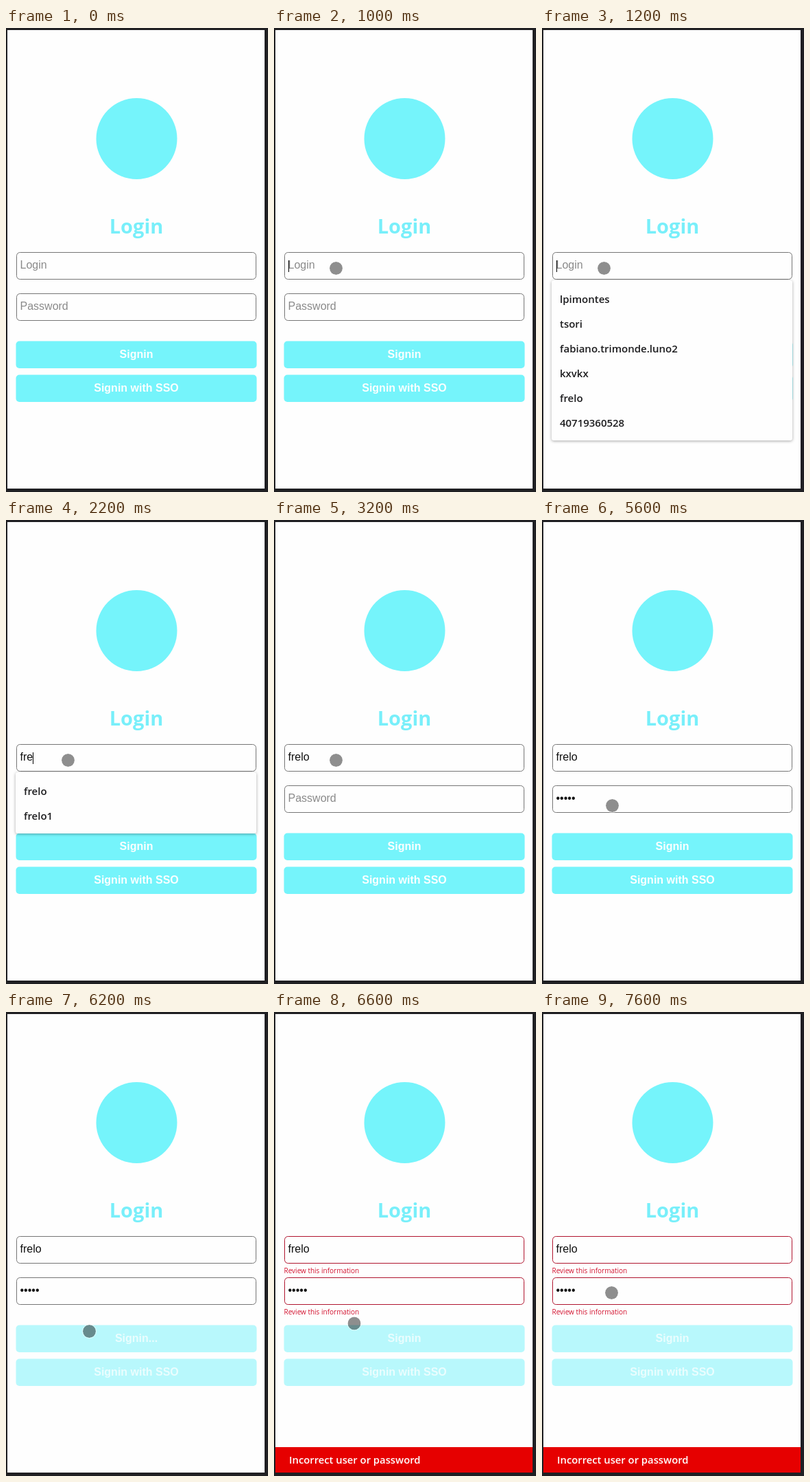
An HTML page with a canvas that plays this animation: 382x675 px, repeating every 8000 ms.

```html
<!DOCTYPE html>
<html lang="en">
<head>
<meta charset="utf-8">
<title>Login</title>
<style>
  html, body { margin: 0; width: 100%; height: 100%; overflow: hidden; background: #1f1f22; }
  canvas { display: block; }
</style>
</head>
<body>
<canvas id="stage" width="382" height="675"></canvas>
<script>
const ctx = document.getElementById('stage').getContext('2d');
const LOOP = 8000, TICK = 200;
const ARIAL = '"Liberation Sans", Arial, sans-serif';
const HUMAN = '"Open Sans", "Noto Sans", sans-serif';
const PAPER = '#fefefe', CYAN = '#75f4fb', PALE = '#b8f8fc';

const USER = 'frelo';
const SAVED = ['lpimontes', 'tsori', 'fabiano.trimonde.luno2', 'kxvkx', USER, '40719360528', USER + '1'];

// Pointer stops: time, x, y
const POINTER = [
  [600, 118, 430], [800, 93, 366], [1000, 90.5, 349.5],
  [5200, 90.5, 349.5], [5400, 95, 377], [5600, 102.5, 415.5],
  [5800, 113, 446], [6000, 121.5, 464.5], [6400, 121.5, 464.5],
  [6600, 117, 453], [6800, 108, 432], [7000, 102, 416],
  [7200, 101.5, 417], [7400, 101.5, 417], [7600, 101.5, 408.5]
];
const PASSWORD_KEYS = [3400, 3600, 3800, 4600, 5000];

function pointerAt(t) {
  if (t < POINTER[0][0]) return null;
  const i = POINTER.findIndex(p => p[0] > t);
  if (i < 0) return POINTER[POINTER.length - 1].slice(1);
  const [t0, x0, y0] = POINTER[i - 1], [t1, x1, y1] = POINTER[i];
  const k = (t - t0) / (t1 - t0);
  return [x0 + (x1 - x0) * k, y0 + (y1 - y0) * k];
}

function text(str, x, y, font, color, align = 'left') {
  ctx.font = font;
  ctx.fillStyle = color;
  ctx.textAlign = align;
  ctx.fillText(str, x, y);
}

function roundBox(x, y, w, h, r) {
  ctx.beginPath();
  ctx.roundRect(x, y, w, h, r);
}

function disc(x, y, r, color) {
  ctx.beginPath();
  ctx.arc(x, y, r, 0, Math.PI * 2);
  ctx.fillStyle = color;
  ctx.fill();
}

function pointer(x, y) {
  disc(x, y, 9.5, 'rgba(0,0,0,.44)');
  ctx.beginPath();
  ctx.arc(x, y, 10, 0, Math.PI * 2);
  ctx.lineWidth = 1;
  ctx.strokeStyle = 'rgba(255,255,255,.6)';
  ctx.stroke();
}

function field(y, value, hint, { caret, error }) {
  const font = '16px ' + ARIAL;
  roundBox(15.5, y + 0.5, 349, 39, 5);
  ctx.lineWidth = 1;
  ctx.strokeStyle = error ? '#b0152f' : '#767676';
  ctx.stroke();
  text(value || hint, 20.5, y + 24, font, value ? '#111' : '#8a8a8a');
  if (caret) {
    const x = Math.round(20.5 + (value ? ctx.measureText(value).width : 0));
    ctx.fillStyle = '#000';
    ctx.fillRect(x, y + 12, 1, 17);
  }
  if (error) text('Review this information', 14.5, y + 54, '10px ' + HUMAN, '#d3122f');
}

function button(y, label, disabled) {
  roundBox(14.5, y - 0.5, 351, 39.5, 5);
  ctx.fillStyle = disabled ? PALE : CYAN;
  ctx.fill();
  text(label, 190, y + 24, 'bold 16px ' + ARIAL, disabled ? '#eafdfe' : '#fbffff', 'center');
}

function suggestions(typed) {
  const list = typed ? SAVED.filter(name => name.startsWith(typed)) : SAVED.slice(0, 6);
  ctx.save();
  ctx.shadowColor = 'rgba(0,0,0,.35)';
  ctx.shadowBlur = 4;
  ctx.shadowOffsetY = 1;
  roundBox(14, 367, 351, 17 + 36 * list.length, 3);
  ctx.fillStyle = PAPER;
  ctx.fill();
  ctx.restore();
  list.forEach((name, i) => text(name, 26, 400 + 36 * i, '600 15px ' + HUMAN, '#1c1c1e'));
}

function banner(y) {
  ctx.save();
  ctx.beginPath();
  ctx.rect(2, 3, 375, 667);
  ctx.clip();
  ctx.fillStyle = '#e60000';
  ctx.fillRect(2, y, 375, 37);
  text('Incorrect user or password', 22, y + 24, '600 14.8px ' + HUMAN, '#fff');
  ctx.restore();
}

function draw(t) {
  const user = USER.slice(0, Math.max(0, Math.floor((t - 1600) / TICK)));
  const dots = '•'.repeat(PASSWORD_KEYS.filter(k => t >= k).length);
  const failed = t >= 6400;
  const busy = t >= 6200;
  const userFocus = t >= 1000 && t < 2800;
  const passFocus = t >= 3000 && t < 5600 && t !== 3200;

  ctx.fillStyle = '#1f1f22';
  ctx.fillRect(0, 0, 382, 675);
  ctx.fillStyle = PAPER;
  ctx.fillRect(2, 3, 375, 667);

  disc(190.5, 161, 59, CYAN);
  text('Login', 190, 299, 'bold 29px ' + HUMAN, '#78effa', 'center');

  field(326, user, 'Login', { caret: userFocus, error: failed });
  field(386, dots, 'Password', { caret: passFocus, error: failed });
  button(456, busy && !failed ? 'Signin...' : 'Signin', busy);
  button(505, 'Signin with SSO', busy);

  if (t >= 1200 && t < 2800) suggestions(user);
  if (failed) banner(t < 6600 ? 652 : 633);

  const spot = pointerAt(t);
  if (spot) pointer(...spot);
}

function loop() {
  const t = performance.now() % LOOP;
  draw(Math.floor(t / TICK) * TICK);
  requestAnimationFrame(loop);
}
loop();
</script>
</body>
</html>
```
